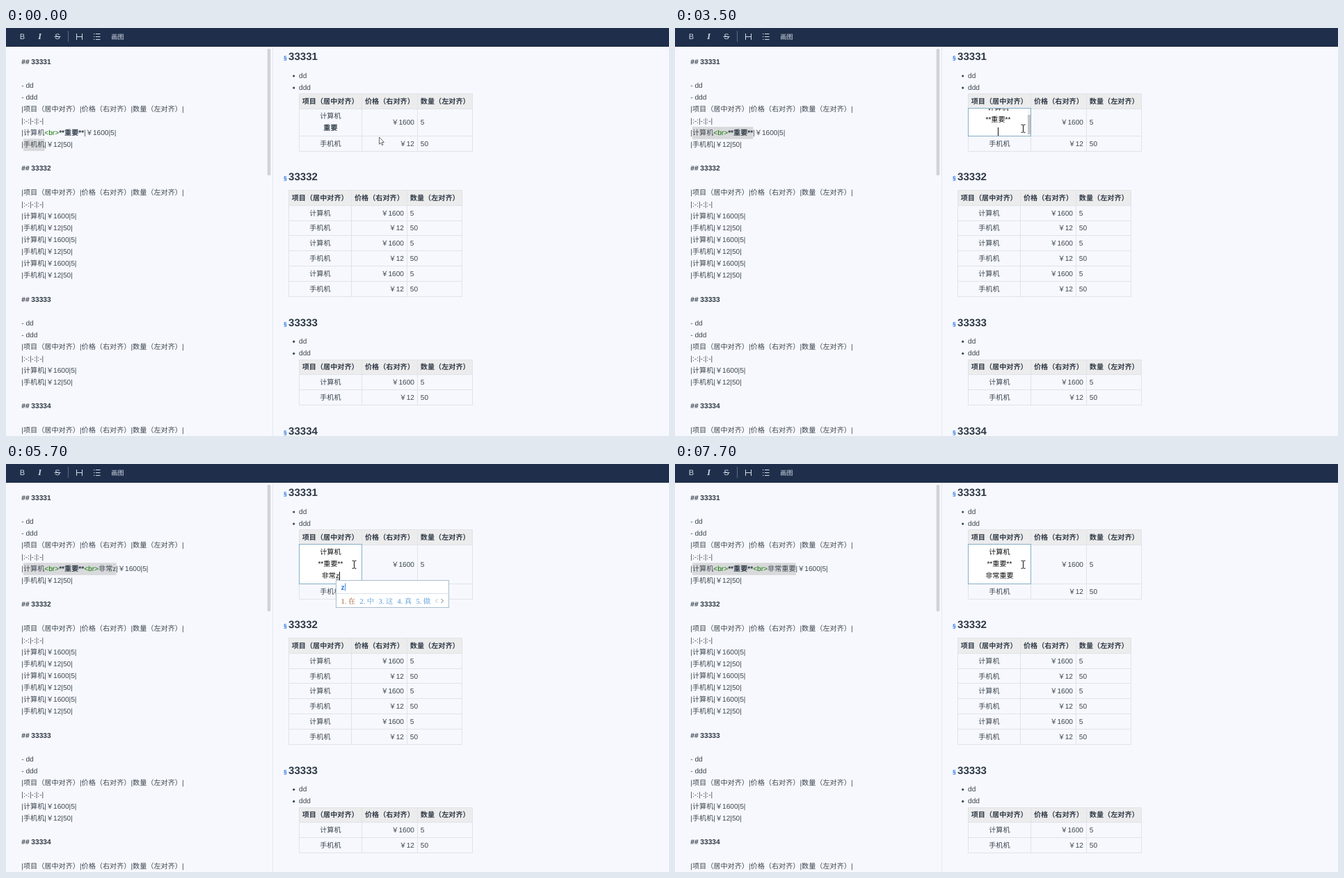
An HTML page for the animation above (8 s loop, 953x587 px).

```html
<!DOCTYPE html>
<html lang="zh">
<head>
<meta charset="utf-8">
<title>Markdown table editing</title>
<style>
  html, body { margin: 0; width: 100%; height: 100%; overflow: hidden; background: #f6f8fd; }
  svg { display: block; width: 953px; height: 587px; }
  text {
    font: 10.15px "Liberation Sans", "Noto Sans CJK SC", sans-serif;
    fill: #3d464f; white-space: pre;
    text-rendering: geometricPrecision; text-spacing-trim: space-all;
  }
  .b { font-weight: 700; fill: #2f3a46; }
  .tag { fill: #117700; }
  .h2 { font-size: 15.1px; }
  .mark { font-size: 8.6px; font-weight: 700; fill: #2f7be0; }
  .edit { fill: #111; }
  .comp { font-size: 10.6px; font-weight: 700; fill: #2a7ae2; }
  .cand { font-family: "Liberation Serif", "Noto Serif CJK SC", "Noto Sans CJK SC", serif; font-size: 10.4px; font-weight: 300; fill: #4b94d8; }
  .first { fill: #a5562f; }
  .tool { fill: #d3dae6; font-size: 11px; text-anchor: middle; }
  .italic { font: italic bold 12px "Liberation Serif", serif; }
  .small { font-size: 9.2px; }
  .end { text-anchor: end; }
  .mid { text-anchor: middle; }
  .line { fill: none; stroke: #dfe3e8; }
  .icon { fill: none; stroke: #d3dae6; }
</style>
</head>
<body>
<svg id="stage" viewBox="0 0 953 587" xmlns="http://www.w3.org/2000/svg"></svg>
<script>
const LOOP = 8000, SIZE = 10.15, ROW = 17.1, LEFT = 22.3;
const HEAD = ['项目（居中对齐）', '价格（右对齐）', '数量（左对齐）'];
const PC = ['计算机', '￥1600', '5'], PHONE = ['手机机', '￥12', '50'];
const stage = document.getElementById('stage');

const pen = document.createElement('canvas').getContext('2d');
function width(s, weight = '') {
  pen.font = weight + ' 100px "Liberation Sans", "Noto Sans CJK SC", sans-serif';
  return pen.measureText(s).width / 100;
}
const wide = s => width(s) * SIZE;
const esc = s => s.replace(/</g, '&lt;').replace(/>/g, '&gt;');
const span = (s, cls) => `<tspan class="${cls}">${esc(s)}</tspan>`;
const raw = (x, y, s, cls = '') => `<text x="${x}" y="${y + 3.5}" class="${cls}">${s}</text>`;
const text = (x, y, s, cls) => raw(x, y, esc(s), cls);
const rect = (x, y, w, h, fill, more = '') =>
  `<rect x="${x}" y="${y}" width="${w}" height="${h}" fill="${fill}" ${more}/>`;
const path = (d, more) => `<path d="${d}" ${more}/>`;
const snap = v => Math.round(v) + .5;
const pipe = cells => '|' + cells.join('|') + '|';

function toolbar() {
  return rect(0, 0, 953, 27, '#1f2f4b') +
    text(23.5, 12.5, 'B', 'tool') +
    text(48.5, 12.5, 'I', 'tool italic') +
    text(74, 12.5, 'S', 'tool') +
    text(160.5, 12.3, '画图', 'tool small') +
    path('M69.5 12.5H78.5M101.5 8V17M109.5 8V17M101.5 12.5H109.5', 'class="icon"') +
    path('M129 8.5H135.5M129 12.5H135.5M129 16.5H135.5M126 8.5h1.4M126 12.5h1.4M126 16.5h1.4', 'class="icon"') +
    path('M89.5 4V20', 'stroke="#5b6880"');
}

function source(s) {
  const y = row => 48 + row * ROW, list = ['- dd', '- ddd'];
  const title = n => ['## 3333' + n, ''];
  const head = [pipe(HEAD), '|:-:|-:|:-|'], pair = [pipe(PC), pipe(PHONE)];
  const rows = [...title(1), ...list, ...head, null, pipe(PHONE), '',
    ...title(2), ...head, ...pair, ...pair, ...pair, '',
    ...title(3), ...list, ...head, ...pair, '', ...title(4), head[0]];
  const name = '计算机<br>**重要**' + s.extra;
  const marks = {
    name1: [6, '|', name],
    price1: [6, `|${name}|`, PC[1]],
    name2: [7, '|', PHONE[0]],
    price2: [7, '|手机机|', PHONE[1]]
  };
  const [row, before, marked] = marks[s.sel];
  const added = s.extra && span('<br>', 'tag') + s.extra.slice(4);
  const edited = '|计算机' + span('<br>', 'tag') + span('**重要**', 'b') + added + '|￥1600|5|';
  return rect(LEFT + wide(before), y(row) - 8.4, wide(marked), 17.6, '#d8d9db') +
    rows.map((r, i) => r === null ? raw(LEFT, y(i), edited)
      : r && text(LEFT, y(i), r, r[0] === '#' ? 'b' : '')).join('') +
    path('M383.5 27V587', 'stroke="#e5e8ee"') +
    rect(375.7, 30, 4.6, 182, '#d1d3d7', 'rx="1.5"');
}

const heading = (n, y) => text(399, y + 1.2, '§', 'mark') +
  text(406, y + 1.3, '3333' + n, 'b h2');

const bullets = y => ['dd', 'ddd'].map((s, i) =>
  `<circle cx="413.7" cy="${y + i * ROW + .5}" r="1.6" fill="#3d464f"/>` + text(421, y + i * ROW, s)).join('');

function table(x, y, rows, tall = 0) {
  const cols = [0, 90.3, 170.2, 249.8].map(c => snap(x + c - .5));
  const edges = [y, y + 21.6];
  rows.forEach((r, i) => edges.push(edges[i + 1] + (i || !tall ? 21.8 : tall)));
  const [l, , , r] = cols, top = snap(y - .5), bottom = snap(edges.at(-1) - .5);
  let out = rect(l, top, r - l, 21.6, '#ececed');
  out += path(edges.map(e => `M${l} ${snap(e - .5)}H${r}`).join('') +
    cols.map(c => `M${c} ${top}V${bottom}`).join(''), 'class="line"');
  HEAD.forEach((h, i) => out += text(x + [4.7, 95, 174.8][i], y + 10.4, h, 'b'));
  rows.forEach(([name, price, count], i) => {
    const m = (edges[i + 1] + edges[i + 2]) / 2;
    if (i || !tall) out += text(x + 45.4, m, name, 'mid');
    else out += text(x + 45.4, y + 32, name, 'mid') + text(x + 45.4, y + 49.2, '重要', 'b mid');
    out += text(x + 166, m, price, 'end') + text(x + 174.8, m, count);
  });
  return out;
}

function preview(s) {
  const d = s.tall ? ROW : 0;
  return heading(1, 41.5) + bullets(68.5) + table(421, 94.7, [PC, PHONE], 39 + d) +
    heading(2, 214.5 + d) + table(406, 233.6 + d, [PC, PHONE, PC, PHONE, PC, PHONE]) +
    heading(3, 424 + d) + bullets(450.7 + d) + table(421, 477 + d, [PC, PHONE]) +
    heading(4, 580.3 + d);
}

const frame = (x, y, w, h) => rect(x, y, w, h, '#fff', 'stroke="#84afc8"');

function editor(s) {
  if (s.cell === 'price2') return frame(511.5, 155.5, 80, 22) + text(587, 166.2, PHONE[1], 'edit end');
  if (s.cell === 'price1') return frame(511.5, 115.5, 80, 40) + text(587, 126.7, PC[1], 'edit end');
  if (s.cell !== 'name1') return '';
  const cx = s.scroll ? 464.5 : 466.4, y = s.scroll ? 114.7 : 126.7;
  const height = s.tall ? 57 : 40;
  const lines = ['计算机', '**重要**'];
  if (s.last !== null) lines.push(s.last + s.comp);
  const end = lines.length - 1, tail = lines[end], ty = y + end * ROW, right = cx + wide(tail) / 2;
  let body = lines.map((l, i) => text(cx, y + i * ROW, l, 'edit mid')).join('');
  if (s.comp) body += path(`M${right - wide(s.comp)} 165.7H${right}`, 'stroke="#333" stroke-width=".7"');
  if (s.caret !== null) body += rect(Math.round(right - s.caret * SIZE - .3), Math.round(ty - 6.35), 1, 12, '#111');
  if (s.scroll) body += rect(507, 116, 4, 39, '#f4f4f4') + rect(507, 125, 4, 28, '#c6c6c6');
  return frame(421.5, 115.5, 90, height) +
    `<clipPath id="cell">${rect(422, 116, 89, height - 1, '#fff')}</clipPath>` +
    `<g clip-path="url(#cell)">${body}</g>`;
}

function popup(s) {
  if (!s.comp) return '';
  const left = Math.floor(466.4 + wide(s.last + s.comp) / 2 - wide(s.comp)) + .5;
  let x = left + 7, items = '';
  s.cands.split(' ').forEach((c, i) => {
    const cls = i ? 'cand' : 'cand first';
    items += text(x, 197, i + 1 + '.', cls) + text(x + 10.3, 197, c, cls);
    x += 16.7 + 10.3 * c.length;
  });
  const right = snap(x + 19.5);
  return rect(left, 167.5, right - left, 39, '#fff', 'stroke="#a9bdcd"') +
    path(`M${left} 186.5H${right}`, 'stroke="#d9e2ea"') +
    text(left + 7, 177, s.comp, 'comp') +
    rect(left + 7.5 + width(s.comp, 'bold') * 10.6, 171.5, .9, 11, '#2a7ae2') + items +
    path(`M${x + 4} 194l-3 3 3 3`, 'fill="none" stroke="#b5bcc4"') +
    path(`M${x + 9} 194l3 3-3 3`, 'fill="none" stroke="#6f7880"');
}

function pointer({ at: [x, y], beam }) {
  return beam
    ? path(`M${x - 3} ${y - 5.5}h2.2l.8.6.8-.6h2.2M${x} ${y - 5}v10M${x - 3} ${y + 5.5}h2.2l.8-.6.8.6h2.2`, 'fill="none" stroke="#111"')
    : path(`M${x} ${y}v10.2l2.3-2.1 1.6 3.6 1.6-.7-1.6-3.5h3.1z`, 'fill="#fff" stroke="#444" stroke-width=".8"');
}

// Each cue changes part of the state and holds until the next one.
const cues = [
  [0, { sel: 'name2', cell: '', extra: '', last: null, comp: '', cands: '', caret: null, scroll: false, tall: false, at: [536.5, 157], beam: false }],
  [100, { at: [539, 158] }],
  [200, { at: [543, 159.5] }],
  [300, { at: [548, 161] }],
  [400, { at: [551, 162] }],
  [500, { at: [552, 163], sel: 'price2', cell: 'price2', beam: true }],
  [900, { at: [552, 161] }],
  [1000, { at: [550, 147], beam: false }],
  [1100, { at: [549, 137] }],
  [1300, { sel: 'price1', cell: 'price1', beam: true }],
  [1400, { at: [541, 138] }],
  [1500, { at: [523, 140] }],
  [1600, { at: [503, 141], beam: false }],
  [1700, { at: [492, 142] }],
  [1900, { at: [489.5, 142] }],
  [2000, { at: [494.5, 143.5], beam: true, sel: 'name1', cell: 'name1', caret: 0 }],
  [2500, { caret: null }],
  [2600, { at: [500.5, 144.7] }],
  [3100, { caret: 0 }],
  [3500, { last: '', scroll: true }],
  [3700, { extra: '<br>' }],
  [4100, { caret: null }],
  [4600, { caret: 0 }],
  [4900, { comp: 'f', cands: '分 发 非 放 份', scroll: false, tall: true }],
  [5000, { comp: 'fe', cands: '非 飞 费 分 风' }],
  [5200, { comp: 'fei', cands: '非 飞 费 肥 废' }],
  [5300, { comp: 'feich', cands: '非常 飞驰 肥肠 非 飞' }],
  [5400, { comp: 'feichang', cands: '非常 肥肠 非 飞 费' }],
  [5600, { comp: '', last: '非常' }],
  [5700, { comp: 'z', cands: '在 中 这 真 做' }],
  [5800, { comp: 'zh', cands: '中 这 着 只 正' }],
  [5900, { comp: 'zho', cands: '中 种 重 众 周' }],
  [6000, { comp: 'zhong', cands: '中 种 重 重要 众' }],
  [6300, { comp: 'zhongy', cands: '重要 中 种 重 众' }],
  [6400, { comp: 'zhongyao', cands: '重要 中药 中 种 重' }],
  [6500, { comp: '', last: '非常重要' }],
  [7000, { caret: null }],
  [7100, { caret: 1 }],
  [7200, { caret: 2 }],
  [7700, { caret: null }]
];

let state = {};
const states = cues.map(([, change]) => {
  state = { ...state, ...change };
  if (state.tall) state.extra = '<br>' + state.last + state.comp;
  return state;
});

let shown = -1;
function tick() {
  const t = performance.now() % LOOP;
  const i = cues.findLastIndex(([start]) => start <= t);
  if (i !== shown) {
    const s = states[shown = i];
    stage.innerHTML = source(s) + preview(s) + toolbar() + editor(s) + popup(s) + pointer(s);
  }
  requestAnimationFrame(tick);
}
tick();
</script>
</body>
</html>
```
